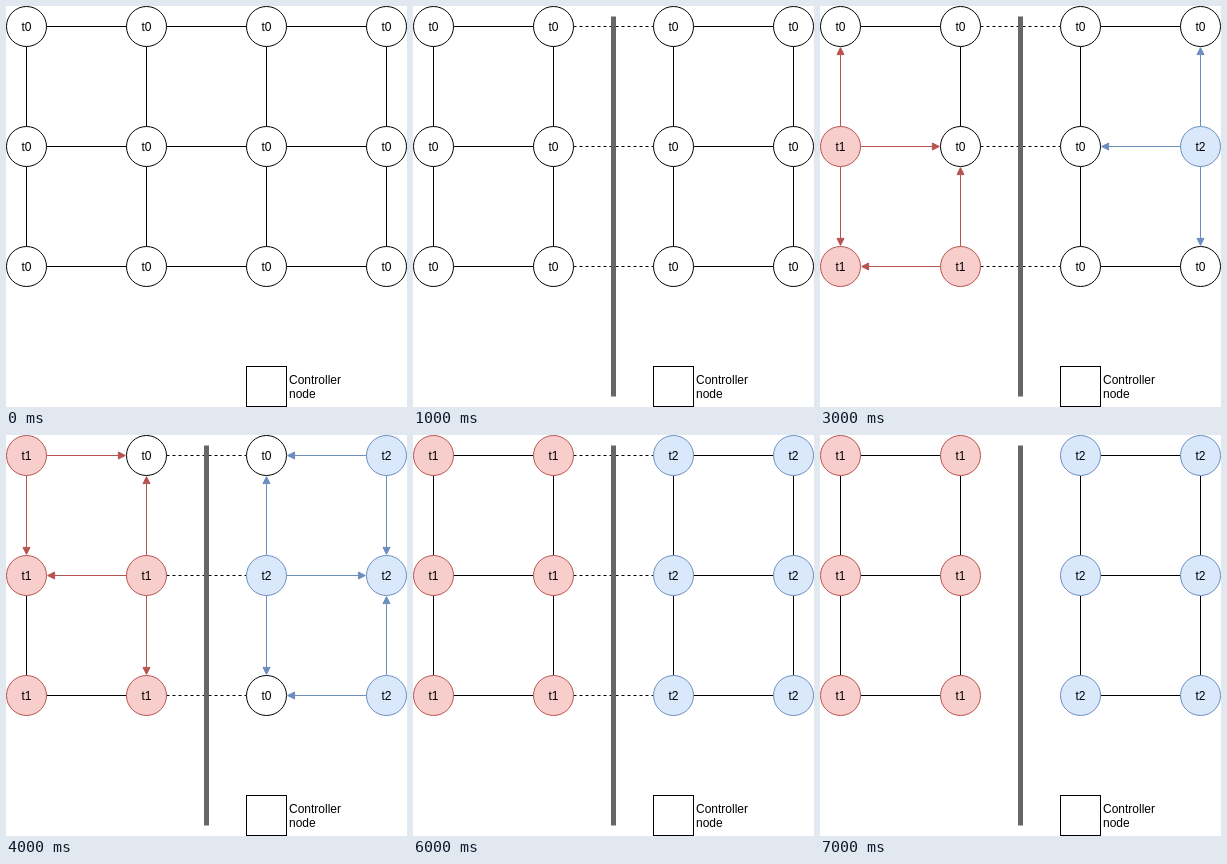
An HTML page that plays this animation: 401x401 px, repeating every 8000 ms.

```html
<!DOCTYPE html>
<html lang="en">
<head>
<meta charset="utf-8">
<title>Partitioned grid</title>
<style>
  html, body { margin: 0; width: 100%; height: 100%; overflow: hidden; background: #fff; }
  svg { display: block; width: 100vw; height: 100vh; }
  text { font: 12px "Liberation Sans", Arial, sans-serif; fill: #000; }
  .mid { text-anchor: middle; }
</style>
</head>
<body>
<svg viewBox="0 0 401 401">
  <g id="grid"></g>
  <rect x="240.5" y="360.5" width="40" height="40" fill="#fff" stroke="#000"/>
  <text x="283" y="378">Controller</text>
  <text x="283" y="392">node</text>
</svg>
<script>
const STEP = 1000, STEPS = 8, COLS = 4, ROWS = 3, R = 20;
const SPLIT = 1, HEALED = 7;
const PLAIN = { name: 't0', fill: '#fff', stroke: '#000' };
// Each side has one seed; its term spreads one hop per step.
const SIDES = [
  { name: 't1', fill: '#f8cecc', stroke: '#b85450', x: 0, y: 2, start: 2 },
  { name: 't2', fill: '#dae8fc', stroke: '#6c8ebf', x: 3, y: 1, start: 3 }
];
const grid = document.getElementById('grid');

const pos = i => 20.5 + 120 * i;
const sideOf = n => SIDES[n.x < 2 ? 0 : 1];
const joinStep = n => {
  const s = sideOf(n);
  return s.start + Math.abs(n.x - s.x) + Math.abs(n.y - s.y);
};

const nodes = [], links = [];
for (let y = 0; y < ROWS; y++) {
  for (let x = 0; x < COLS; x++) {
    const n = { x, y };
    nodes.push(n);
    if (x + 1 < COLS) links.push([n, { x: x + 1, y }]);
    if (y + 1 < ROWS) links.push([n, { x, y: y + 1 }]);
  }
}

function line(a, b, extra = '') {
  const dx = b.x - a.x, dy = b.y - a.y;
  return `<path d="M${pos(a.x) + dx * R} ${pos(a.y) + dy * R}` +
    `L${pos(b.x) - dx * R} ${pos(b.y) - dy * R}" fill="none" stroke="#000" ${extra}/>`;
}

function arrow(a, b) {
  const angle = Math.atan2(b.y - a.y, b.x - a.x) * 180 / Math.PI;
  const c = sideOf(a).stroke;
  return `<g transform="translate(${pos(a.x)} ${pos(a.y)}) rotate(${angle})" fill="${c}" stroke="${c}">` +
    `<path d="M20 0H92"/><path d="M98.88 0l-7 3.5v-7z" stroke-miterlimit="10"/></g>`;
}

function link([a, b], step) {
  if (step >= SPLIT && sideOf(a) !== sideOf(b)) {
    return step < HEALED ? line(a, b, 'stroke-dasharray="3 3"') : '';
  }
  if (joinStep(a) === step) return arrow(a, b);
  if (joinStep(b) === step) return arrow(b, a);
  return line(a, b);
}

function node(n, step) {
  const s = step >= joinStep(n) ? sideOf(n) : PLAIN;
  const x = pos(n.x), y = pos(n.y);
  return `<circle cx="${x}" cy="${y}" r="${R}" fill="${s.fill}" stroke="${s.stroke}"/>` +
    `<text class="mid" x="${x}" y="${y + 4.5}">${s.name}</text>`;
}

function draw(step) {
  const wall = step >= SPLIT ? '<path d="M200.5 10.5V390.5" stroke="#666" stroke-width="5"/>' : '';
  grid.innerHTML = links.map(l => link(l, step)).join('') +
    nodes.map(n => node(n, step)).join('') + wall;
}

let shown = -1;
function tick() {
  const step = Math.floor(performance.now() / STEP) % STEPS;
  if (step !== shown) draw(shown = step);
  requestAnimationFrame(tick);
}
tick();
</script>
</body>
</html>
```
